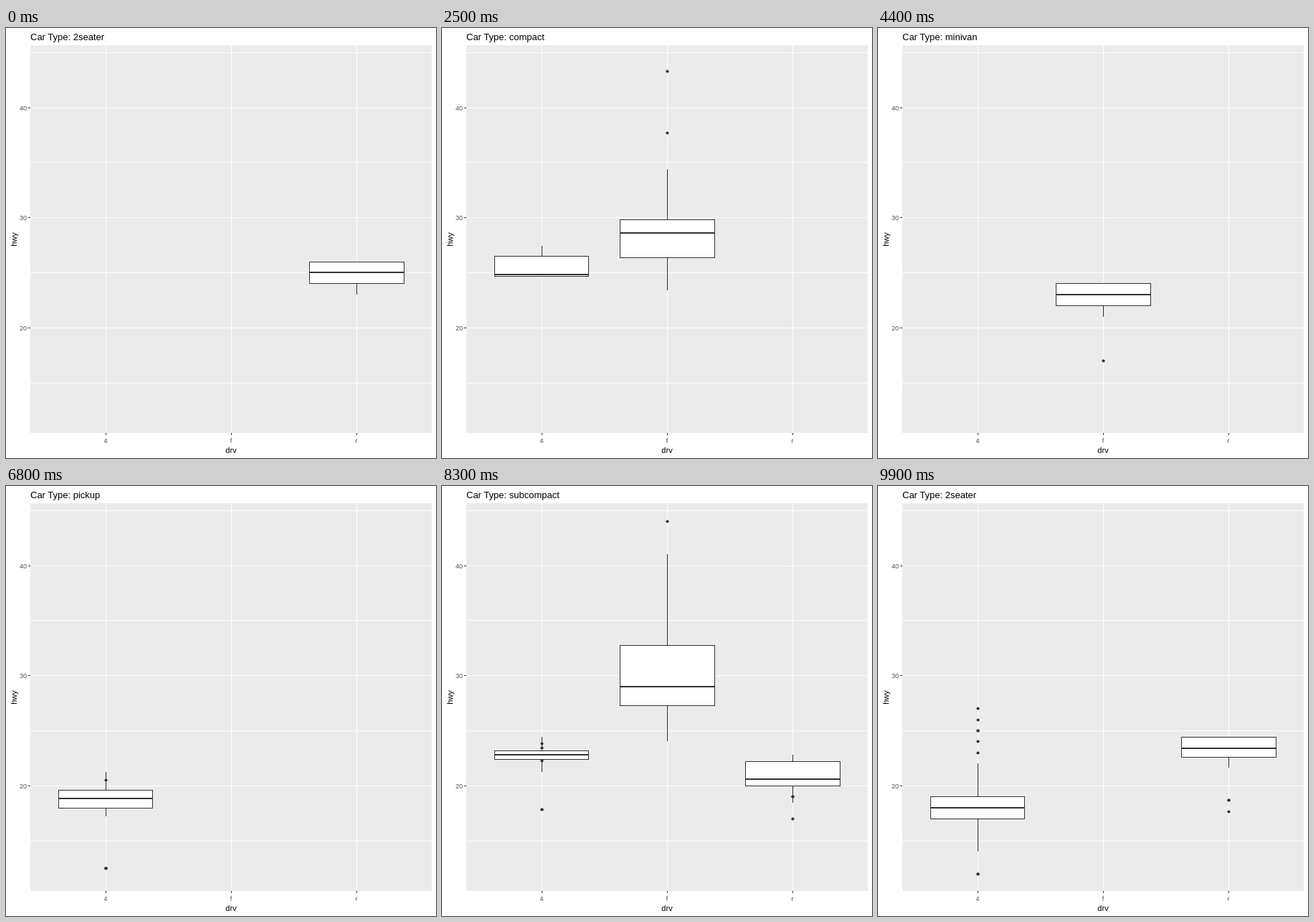
Write an HTML page that moves like this. It is 600 px wide and 600 px high and loops after 10000 ms.

```html
<!DOCTYPE html>
<html lang="en">
<head>
<meta charset="utf-8">
<title>Highway mileage by drive</title>
<style>
  html, body { margin: 0; width: 100%; height: 100%; overflow: hidden; background: #fff; }
  svg { display: block; width: 600px; height: 600px; font-family: "Liberation Sans", Arial, sans-serif; }
  rect { shape-rendering: crispEdges; }
  .label { font-size: 9px; fill: #4d4d4d; }
  .axis { font-size: 11px; text-anchor: middle; }
</style>
</head>
<body>
<svg viewBox="0 0 600 600">
  <rect width="600" height="600" fill="#fff"/>
  <rect x="34" y="24" width="560" height="541" fill="#ebebeb"/>
  <g id="grid"></g>
  <g id="plot"></g>
  <text id="title" x="34" y="17" font-size="13"></text>
  <text class="axis" x="314" y="593">drv</text>
  <text class="axis" transform="translate(15 295) rotate(-90)">hwy</text>
</svg>
<script>
const INK = "#333";
const DRIVES = { 4: { x: 139, left: 73, right: 204 }, f: { x: 314, left: 248, right: 380 }, r: { x: 489, left: 423, right: 555 } };

// Each box: five numbers (min, Q1, median, Q3, max) and its outliers.
const box = (five, outliers = []) => ({ five, outliers });
const STATES = [
  { name: "2seater", boxes: { r: box([23, 24, 25, 26, 26]) } },
  { name: "compact", boxes: { 4: box([25, 25, 25, 27, 28]), f: box([23, 26.5, 29, 30, 35], [37, 44]) } },
  { name: "midsize", boxes: { 4: box([23, 23.5, 24, 24.5, 25]), f: box([25, 26, 27, 29, 32]) } },
  { name: "minivan", boxes: { f: box([21, 22, 23, 24, 24], [17]) } },
  { name: "pickup", boxes: { 4: box([15, 16, 17, 18, 20], [12, 12, 12, 22]) } },
  { name: "subcompact", boxes: {
    4: box([26, 26, 26, 26, 26]), f: box([24, 27.25, 29, 32.75, 41], [44]), r: box([20, 22, 23, 25, 26]) } },
  { name: "suv", boxes: {
    4: box([14, 17, 18, 19, 22], [12, 12, 23, 24, 25, 25, 26, 27]), r: box([16, 17, 17, 18, 18], [15, 20, 20]) } }
];
const ENDS = [14, 29, 44, 58, 72, 86, 100]; // tick at which each state has become the next
const STEPS = 5;

const py = v => Math.floor(418.4 - (v - 20) * 15.37);
const rect = (x, y, w, h, fill) => `<rect x="${x}" y="${y}" width="${w}" height="${h}" fill="${fill}"/>`;
const mean = list => list.reduce((a, b) => a + b, 0) / list.length;
const mix = (from, to, p) => from.map((v, i) => v + (to[i] - v) * p);

// A missing set of outliers collapses to the mean of the other set.
function mixOutliers(a, b, p) {
  if (!a.length && !b.length) return [];
  return mix(a.length ? a : b.map(() => mean(b)), b.length ? b : a.map(() => mean(a)), p);
}

function drawGrid() {
  let out = "";
  for (let v = 15; v <= 45; v += 5) out += rect(34, py(v), 560, 1, "#fff");
  for (const v of [20, 30, 40]) {
    out += rect(31, py(v), 3, 1, INK);
    out += `<text class="label" x="29" y="${py(v) + 4}" text-anchor="end">${v}</text>`;
  }
  for (const [name, { x }] of Object.entries(DRIVES)) {
    out += rect(x, 24, 1, 541, "#fff") + rect(x, 565, 1, 3, INK);
    out += `<text class="label" x="${x}" y="579" text-anchor="middle">${name}</text>`;
  }
  document.getElementById("grid").innerHTML = out;
}

function drawBox({ x, left, right }, { five, outliers }) {
  const [min, q1, median, q3, max] = five.map(py);
  const width = right - left + 1;
  const dots = outliers.map(v => `<circle cx="${x + 0.5}" cy="${py(v) + 0.5}" r="2.1" fill="${INK}"/>`);
  return dots.join("") +
    rect(x, max, 1, q3 - max, INK) + rect(x, q1, 1, min - q1, INK) +
    rect(left, q3, width, q1 - q3 + 1, INK) +
    (q1 - q3 > 1 ? rect(left + 1, q3 + 1, width - 2, q1 - q3 - 1, "#fff") : "") +
    rect(left, median - 1, width, 2, INK);
}

function draw(tick) {
  const index = ENDS.findIndex(end => tick < end);
  const state = STATES[index], next = STATES[(index + 1) % STATES.length];
  const step = Math.max(0, tick - ENDS[index] + STEPS);
  const p = step / STEPS;
  let out = "";
  for (const [name, now] of Object.entries(state.boxes)) {
    const then = next.boxes[name];
    const shown = p && then
      ? box(mix(now.five, then.five, p), mixOutliers(now.outliers, then.outliers, p))
      : now;
    out += drawBox(DRIVES[name], shown);
  }
  document.getElementById("plot").innerHTML = out;
  document.getElementById("title").textContent = "Car Type: " + (step >= 4 ? next : state).name;
}

let lastTick = -1;
function play() {
  const tick = Math.floor(performance.now() % 10000 / 100);
  if (tick !== lastTick) draw(lastTick = tick);
  requestAnimationFrame(play);
}
drawGrid();
play();
</script>
</body>
</html>
```
